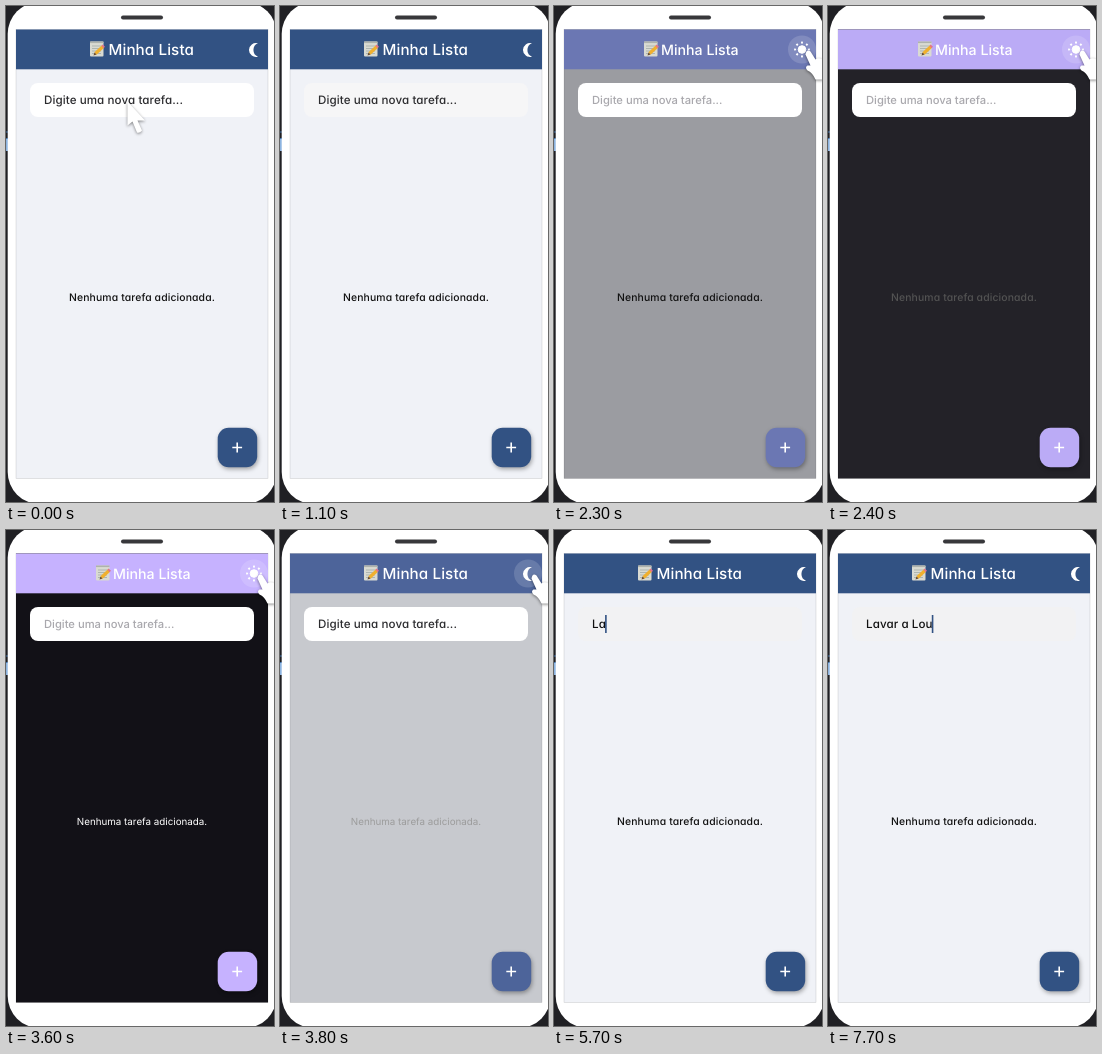
These frames come from a looping animation (268 px wide and 496 px high, 8000 ms). An HTML page:

```html
<!DOCTYPE html>
<html lang="pt">
<head>
<meta charset="utf-8">
<style>
  html, body { margin: 0; height: 100%; overflow: hidden; background: #202024; }
  svg { display: block; width: 268px; height: 496px; }
  text { font-family: Inter, Roboto, sans-serif; white-space: pre; text-rendering: geometricPrecision; }
  .geo { font-feature-settings: "cv11"; }
  #title { font-size: 14.2px; font-weight: 500; fill: #fff; }
  #title.geo { font-size: 15.2px; letter-spacing: .1px; }
  #hint { font-size: 11.2px; fill: #a9a8ad; font-weight: 500; }
  #hint.geo { fill: #2b2b2e; }
  #hint.geo, #typed { font-size: 11.6px; letter-spacing: .08px; font-weight: 500; }
  #empty { font-size: 9.8px; text-anchor: middle; }
  #empty.geo { font-size: 10.4px; font-weight: 500; letter-spacing: .12px; }
  #fab { filter: drop-shadow(1px 2px 2px #0005); }
  .cursor { fill: #fff; filter: drop-shadow(0 1px 1.5px #0007); }
</style>
</head>
<body>
<svg viewBox="0 0 268 496">
  <path d="M0 126h2.500M0 132.500h2.500" stroke="#3c6ea5"/>
  <rect y="133" width="2.500" height="12" fill="#8db4e0"/>
  <rect x="1.700" y="-4" width="269" height="502" rx="32" fill="#fff"/>
  <rect x="115" y="9.500" width="42" height="4" rx="2" fill="#38383b"/>

  <rect id="screen" x="10" y="23.500" width="252" height="449" stroke="#0003" stroke-width=".5"/>
  <rect id="bar" x="10" y="23.500" width="252" height="39.800"/>

  <g id="memo">
    <rect x="84" y="35.500" width="13.500" height="15" rx="1" fill="#d9dad2"/>
    <path d="M84 36.300h13.500" stroke="#aeb2ac" stroke-width="1.600"/>
    <path d="M86 40h9M86 42.500h9M86 45h9M86 47.500h9" stroke="#a3aca8" stroke-width=".8"/>
    <path d="M89.500 47.500L97 40.500" stroke="#f0b02e" stroke-width="3.200"/>
    <path d="M96.500 41l1.300-1.300" stroke="#e2748a" stroke-width="3.200"/>
    <path d="M87.500 49.500l1-3 2 2z" fill="#6b4a2c"/>
  </g>
  <text id="title" y="48.500">Minha Lista</text>

  <circle id="halo" cx="248" cy="43.500" r="14" fill="#fff"/>
  <path id="moon" d="M252 37.300A7 7 0 1 0 252 50.700A7.200 7.200 0 0 1 252 37.300z" fill="#fff"/>
  <g id="sun" fill="#fff" stroke="#fff">
    <circle cx="248" cy="43.500" r="3.800"/>
    <circle cx="248" cy="43.500" r="6.900" fill="none" stroke-width="2" pathLength="16" stroke-dasharray=".7 1.3" stroke-dashoffset=".35"/>
  </g>

  <rect id="field" x="24" y="77" width="224" height="34" rx="8"/>
  <text id="hint" x="38" y="98">Digite uma nova tarefa...</text>
  <text id="typed" class="geo" x="38" y="98" fill="#111" xml:space="preserve"></text>
  <rect id="caret" y="85" width="1.600" height="18" fill="#325283"/>

  <text id="empty" x="136" y="295">Nenhuma tarefa adicionada.</text>

  <rect id="fab" x="211.700" y="421.700" width="39.500" height="39.500" rx="11"/>
  <path d="M226.300 441.500h9.800M231.200 436.600v9.800" stroke="#fff" stroke-width="1.600"/>

  <path id="arrow" class="cursor" d="M0 0V24L5 20L9.500 31Q12 32 14.500 29L10 19H17.500z"/>
  <path id="hand" class="cursor" d="M0 4Q1-2 5 1L10 9Q14 6 18 10V29H10Q7 22 2 20Q-1 17 2 15L5 15z"/>
</svg>
<script>
const LOOP = 8000;
const phrase = 'Lavar a Lou';
const keyTimes = [5100, 5700, 5800, 5900, 6100, 6300, 6500, 6700, 7100, 7500, 7700];
const light = { screen: [240, 242, 247], accent: [50, 82, 131], text: [17, 17, 17] };
const dark = { screen: [18, 17, 23], accent: [198, 178, 255], text: [255, 255, 255] };

const $ = id => document.getElementById(id);
const set = (id, name, value) => $(id).setAttribute(name, value);
const show = (id, on) => set(id, 'visibility', on ? 'visible' : 'hidden');
const geo = (id, on) => $(id).classList.toggle('geo', on);
const ramp = (t, from, to) => Math.min(1, Math.max(0, (t - from) / (to - from)));
const mix = (a, b, p) => a + (b - a) * p;
const blend = (a, b, p) => `rgb(${a.map((v, i) => Math.round(mix(v, b[i], p)))})`;
const place = (id, x, y) => set(id, 'transform', `translate(${x} ${y})`);

function drawTheme(t) {
  const night = t > 2230 && t < 3650;
  const p = ramp(t, 2230, 2415) - ramp(t, 3650, 3835);
  const textP = ramp(t, 2350, 2535) - ramp(t, 3724, 3909);
  const accent = blend(light.accent, dark.accent, p);
  set('screen', 'fill', blend(light.screen, dark.screen, p));
  set('bar', 'fill', accent);
  set('fab', 'fill', accent);
  set('empty', 'fill', blend(light.text, dark.text, textP));
  geo('empty', textP < .5);
  geo('title', !night);
  geo('hint', !night);
  set('title', 'x', night ? 107 : 102.5);
  place('memo', night ? 6 : 0, 0);
  show('sun', night);
  show('moon', !night);
}

function drawField(t) {
  const hover = ramp(t, 100, 400) - ramp(t, 1000, 1300) + ramp(t, 4200, 4400);
  set('field', 'fill', blend([255, 255, 255], [242, 242, 243], hover));
  const count = keyTimes.filter(k => k <= t).length;
  $('typed').textContent = phrase.slice(0, count);
  show('hint', !count);
  show('caret', t >= 4900);
  set('caret', 'x', 38 + (count ? $('typed').getComputedTextLength() - .8 : 0));
}

function drawCursor(t) {
  const enter = 1 - ramp(t, 1450, 1700);
  const leave = ramp(t, 4150, 4350);
  place('hand', 251.5 + 16 * enter, 44.5 + 4 * enter);
  show('hand', t >= 1450 && t < 4150);
  place('arrow', t < 100 ? 121.5 : mix(253, 130, leave), t < 100 ? 95.5 : mix(46, 92, leave));
  show('arrow', t < 100 || (t >= 4150 && t < 4350));
  set('halo', 'opacity', .15 * (ramp(t, 1950, 2100) - ramp(t, 4150, 4250)));
}

function frame(now) {
  const t = now % LOOP;
  drawTheme(t);
  drawField(t);
  drawCursor(t);
  requestAnimationFrame(frame);
}
frame(0);
</script>
</body>
</html>
```
